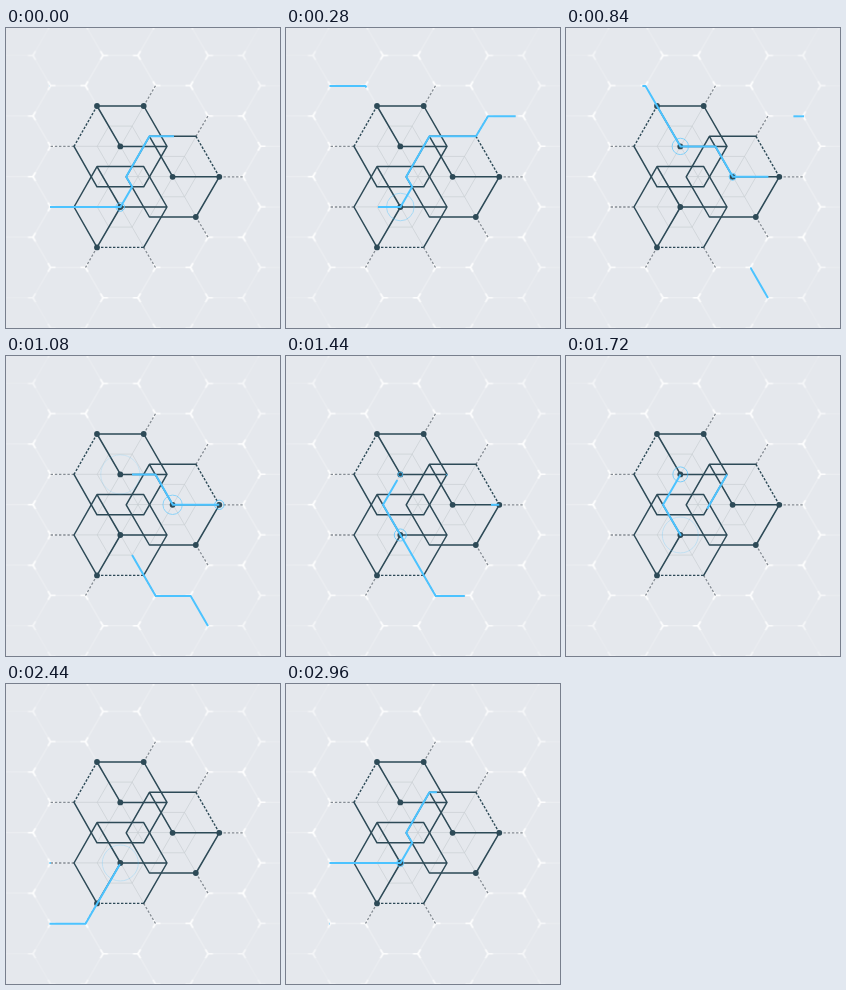
Animation, 274 px wide and 300 px high, one loop 3000 ms. Source, as an HTML page without scripts:

```html
<!DOCTYPE html>
<html lang="en">
<head>
<meta charset="utf-8">
<title>Hex circuit</title>
<style>
@property --head { syntax: "<number>"; inherits: false; initial-value: 0; }
@property --tail { syntax: "<number>"; inherits: false; initial-value: 0; }

html, body { margin: 0; width: 100%; height: 100%; overflow: hidden; background: #e5e8ed; }
svg { display: block; width: 274px; height: 300px; }
path, circle, use { fill: none; }

.mesh { stroke: #fff; }
.faint { stroke: #c9ced3; stroke-width: .7; }
.stub { stroke: #858c94; stroke-width: 1.3; stroke-dasharray: 2.4 1.8; }
.edge { stroke: #2d4a57; stroke-width: 1.5; stroke-linejoin: round; stroke-linecap: round; }
.dash { stroke: #2d4a57; stroke-width: 1.4; stroke-dasharray: 2.4 1.6; }
.node circle { fill: #2d4a57; }

/* The head of each trace runs first, the tail follows 580 ms later. */
.trace path {
  stroke: #4cc3ff;
  stroke-width: 2;
  stroke-linejoin: round;
  stroke-dasharray: max(0px, calc((var(--head) - var(--tail)) * 1px)) 300px;
  stroke-dashoffset: calc(var(--tail) * -1px);
  animation: head 3s calc(var(--at) - 3s) infinite, tail 3s calc(var(--at) - 3s) infinite;
}
@keyframes head {
  0% { --head: 0; animation-timing-function: cubic-bezier(.455, .03, .515, .955); }
  33.33%, 100% { --head: 100; }
}
@keyframes tail {
  0% { --tail: 0; }
  19.3% { --tail: 0; animation-timing-function: cubic-bezier(.455, .03, .515, .955); }
  52.6%, 100% { --tail: 100; }
}

.ring circle {
  stroke: #4cc3ff;
  stroke-width: 1;
  opacity: 0;
  animation: ring 3s calc(var(--at) - 3s) infinite;
}
.ring .quick { animation-name: quick; }
@keyframes ring {
  0% { r: 2px; opacity: .9; animation-timing-function: cubic-bezier(.55, .085, .68, .53); }
  23%, 100% { r: 24px; opacity: 0; }
}
@keyframes quick {
  0% { r: 2px; opacity: 1; animation-timing-function: cubic-bezier(.55, .085, .68, .53); }
  11.5%, 100% { r: 14px; opacity: 0; }
}
</style>
</head>
<body>
<svg viewBox="0 0 274 300">
  <defs>
    <path id="cell" d="M35 15.15H70M35 15.15L17.5 45.45M35 15.15L17.5 -15.15M17.5 45.45L35 75.75
      M70 15.15L87.5 45.45M70 15.15L87.5 -15.15M87.5 45.45L70 75.75
      M87.5 45.45H122.5M-17.5 45.45H17.5"/>
    <pattern id="comb" x="114.5" y="103.15" width="105" height="60.6" patternUnits="userSpaceOnUse">
      <g class="mesh">
        <use href="#cell" stroke-width="1" opacity=".4"/>
        <use href="#cell" stroke-width="1.7" stroke-dasharray="5 25 5 0"/>
      </g>
    </pattern>
    <radialGradient id="fade" gradientUnits="userSpaceOnUse" cx="137" cy="149" r="195">
      <stop offset=".6" stop-color="#fff"/>
      <stop offset="1" stop-color="#444"/>
    </radialGradient>
    <mask id="soft"><rect width="274" height="300" fill="url(#fade)"/></mask>
    <polygon id="hex" points="46.6,0 23.3,40.4 -23.3,40.4 -46.6,0 -23.3,-40.4 23.3,-40.4"/>
    <path id="web" d="M-46.6 0H46.6M-23.3 -40.4L23.3 40.4M23.3 -40.4L-23.3 40.4
      M23.3 0L11.65 20.2H-11.65L-23.3 0L-11.65 -20.2H11.65Z"/>
  </defs>

  <rect width="274" height="300" fill="#e5e8ed"/>
  <rect width="274" height="300" fill="url(#comb)" mask="url(#soft)"/>

  <g style="fill:#e5e8ed">
    <use href="#hex" x="114.5" y="118.3" style="fill:inherit"/>
    <use href="#hex" x="114.5" y="178.9" style="fill:inherit"/>
    <use href="#hex" x="166.9" y="148.6" style="fill:inherit"/>
  </g>
  <g class="faint">
    <use href="#web" x="114.5" y="118.3"/>
    <use href="#web" x="114.5" y="178.9"/>
    <use href="#web" x="166.9" y="148.6"/>
  </g>

  <path class="stub" d="M137.7 78L149.5 57.7M68 118.4H44.5M68 179H44.5M91 219.4L79.5 239.5M137.7 219.4L149.5 239.5
    M213.3 148.8H237M190 108.3L202 88M190 189L202 209.2"/>

  <path class="edge" d="M91 78H137.7L161 118.4L137.7 158.8H91L68 118.4M91 78L114.5 118.4H161"/>
  <path class="edge" d="M91 219.4L68 179L91 138.6H137.7L161 179L137.7 219.4M91 138.6L114.5 179H161M114.5 179L91 219.4"/>
  <path class="edge" d="M213.3 148.8L190 189H143.4L120.2 148.8L143.4 108.3H190M143.4 108.3L166.8 148.8H213.3"/>
  <path class="dash" d="M68 118.4L91 78M91 219.4H137.7M190 108.3L213.3 148.8"/>

  <g class="node">
    <circle cx="91" cy="78" r="2.9"/>
    <circle cx="137.7" cy="78" r="2.9"/>
    <circle cx="114.3" cy="118.4" r="2.9"/>
    <circle cx="114.3" cy="179" r="2.9"/>
    <circle cx="91" cy="219.4" r="2.9"/>
    <circle cx="166.6" cy="148.8" r="2.9"/>
    <circle cx="213.3" cy="148.8" r="2.9"/>
    <circle cx="189.8" cy="189" r="2.9"/>
  </g>

  <g class="trace">
    <path pathLength="100" style="--at:-.005s" d="M43.5 58H79.5L114.5 118.5H149.5L166.8 148.8H213.3"/>
    <path pathLength="100" style="--at:.558s" d="M202 270L184.7 240H149.7L97 148.8L114.5 118.4"/>
    <path pathLength="100" style="--at:1.403s" d="M161 118.4L137.7 158.8H126.2L79.5 239.8H43.5"/>
    <path pathLength="100" style="--at:2.402s" d="M43.5 179H114.5L126.2 158.8L120.2 148.8L143.4 108.3H190L202 88.3H238"/>
  </g>

  <g class="ring">
    <circle cx="91" cy="78" class="quick" style="--at:.36s"/>
    <circle cx="114.3" cy="118.4" style="--at:.48s"/>
    <circle cx="166.6" cy="148.8" style="--at:.68s"/>
    <circle cx="213.3" cy="148.8" class="quick" style="--at:.92s"/>
    <circle cx="114.3" cy="179" style="--at:1.15s"/>
    <circle cx="114.3" cy="118.4" style="--at:1.38s"/>
    <circle cx="114.3" cy="179" style="--at:1.87s"/>
    <circle cx="91" cy="219.4" class="quick" style="--at:2s"/>
    <circle cx="114.3" cy="179" style="--at:2.79s"/>
  </g>
</svg>
</body>
</html>
```
